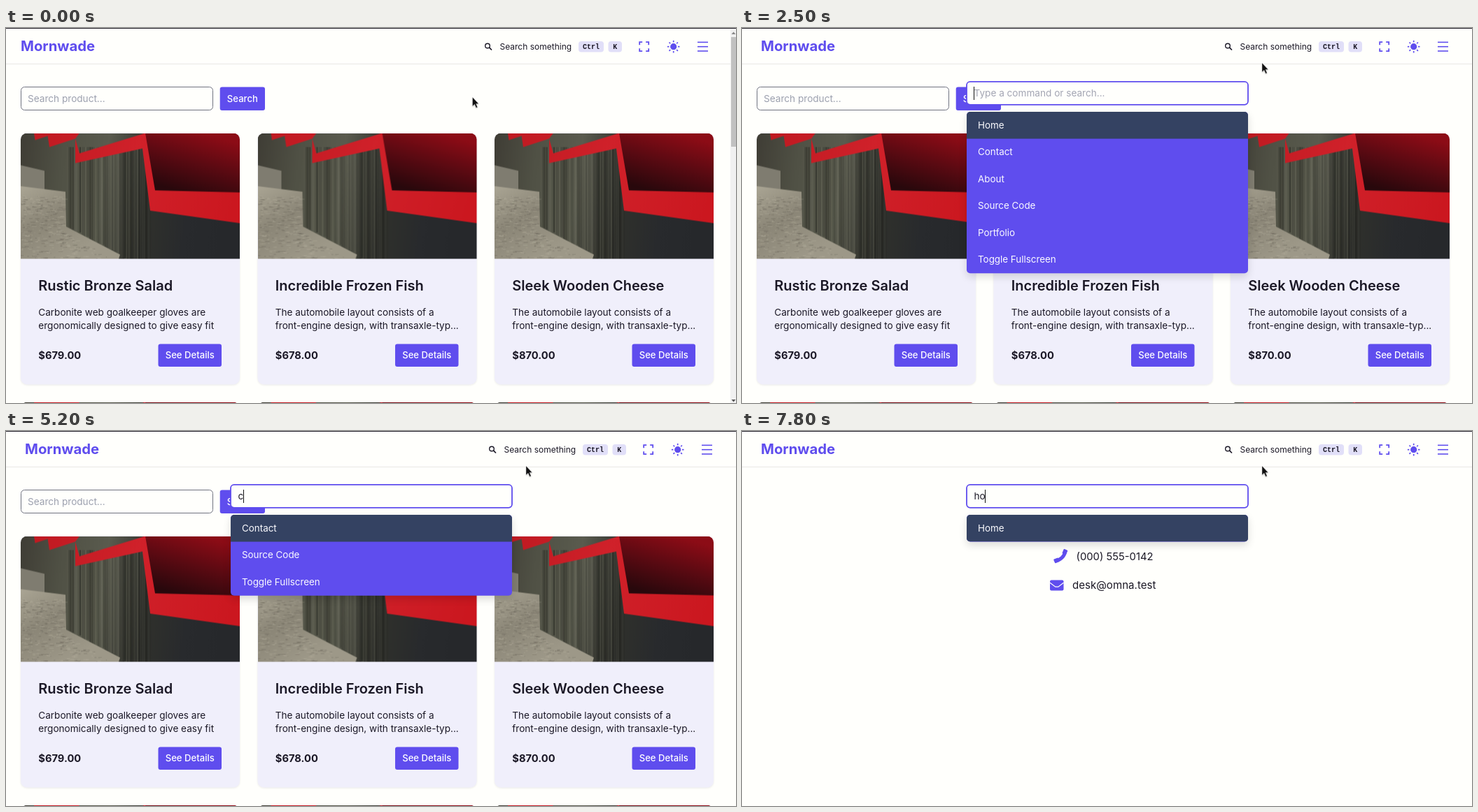
Recreate the animation shown at these times as an HTML page with a canvas. Size 1043 px wide and 537 px high, loop 8 s.

```html
<!DOCTYPE html>
<html lang="en">
<head>
<meta charset="utf-8">
<title>Shop command menu</title>
<style>
html, body { margin: 0; width: 100%; height: 100%; overflow: hidden; background: #fffffc; }
canvas { display: block; }
</style>
</head>
<body>
<canvas id="stage" width="1043" height="537"></canvas>
<script>
const W = 1043, H = 537, LOOP = 8000, TICK = 100;
const PAGE = '#fffffc', PURPLE = '#5f4dee', SLATE = '#344262', INK = '#1b1826';
const OPEN_SHOP = 1250, TYPE_CONTACT = 5200, GO_CONTACT = 5900, OPEN_CONTACT = 6900;
const ctx = document.getElementById('stage').getContext('2d');

const MENU = ['Home', 'Contact', 'About', 'Source Code', 'Portfolio', 'Toggle Fullscreen'];
const FRONT_ENGINE = ['The automobile layout consists of a', 'front-engine design, with transaxle-typ...'];
const CARDS = [
  ['Rustic Bronze Salad', '$679.00', 'Carbonite web goalkeeper gloves are', 'ergonomically designed to give easy fit'],
  ['Incredible Frozen Fish', '$678.00', ...FRONT_ENGINE],
  ['Sleek Wooden Cheese', '$870.00', ...FRONT_ENGINE]
];

const clamp = (v, lo = 0, hi = 1) => Math.min(hi, Math.max(lo, v));
const mix = (a, b, p) => a + (b - a) * p;

// ---- motion ----

// Three hand movements, each with a start, a duration and an end point
function pointerAt(t) {
  let x = 666.5, y = 99;
  for (const [start, duration, toX, toY] of [[200, 200, 696, 78], [500, 200, 751, 33], [1800, 300, 743, 50]]) {
    const p = clamp((t - start) / duration);
    x = mix(x, toX, p);
    y = mix(y, toY, p);
  }
  return [x, y];
}

// Entrance overshoots to 1.01 and settles over 200 ms; exit shrinks and fades
function modalAt(t) {
  const exit = (t - GO_CONTACT) / 200;
  if (exit >= 0 && exit < 1) return { scale: 1 - exit * .01, alpha: 1 - exit, closing: true };
  const p = clamp((t - (t < GO_CONTACT ? OPEN_SHOP : OPEN_CONTACT)) / 200);
  return { scale: p < .5 ? .99 + p * .04 : 1.02 - p * .02, alpha: clamp(p * 2) };
}

function queryAt(t) {
  const typed = (word, keys) => word.slice(0, keys.filter(key => t >= key).length);
  return t < OPEN_CONTACT ? typed('conta', [5200, 5300, 5300, 5500, 5600]) : typed('ho', [7600, 7800]);
}

// Four rows down, then three back up, one key press every 200 ms
function activeAt(t) {
  if (t >= TYPE_CONTACT) return 0;
  const down = Math.round(clamp(1 + 1.5 * Math.floor((t - 3000) / 200), 0, 4));
  const up = clamp(1 + Math.floor((t - 3700) / 200), 0, 3);
  return down - up;
}

function caretAt(t) {
  if (t >= TYPE_CONTACT) return t < GO_CONTACT || t >= OPEN_CONTACT;
  return Math.floor((t - 1300) / 600) % 2 === 0;
}

// ---- drawing helpers ----

function text(str, x, y, size, weight = 400, color = INK, align = 'left', family = 'Inter, sans-serif') {
  ctx.font = `${weight} ${size}px ${family}`;
  ctx.textAlign = align;
  ctx.fillStyle = color;
  ctx.fillText(str, x, y);
}

function box(x, y, w, h, r, fill, stroke, line = 1) {
  ctx.beginPath();
  ctx.roundRect(x, y, w, h, r);
  if (fill) { ctx.fillStyle = fill; ctx.fill(); }
  if (stroke) { ctx.strokeStyle = stroke; ctx.lineWidth = line; ctx.stroke(); }
}

function poly(c, points, fill) {
  c.beginPath();
  points.forEach(([x, y]) => c.lineTo(x, y));
  c.closePath();
  c.fillStyle = fill;
  c.fill();
}

function line(points, color, width) {
  ctx.beginPath();
  points.forEach(([x, y]) => ctx.lineTo(x, y));
  ctx.strokeStyle = color;
  ctx.lineWidth = width;
  ctx.stroke();
}

function arc(x, y, r, from = 0, to = Math.PI * 2) {
  ctx.beginPath();
  ctx.arc(x, y, r, from, to);
}

function withShadow(alpha, blur, dy, paint) {
  ctx.save();
  ctx.shadowColor = `rgba(0,0,0,${alpha})`;
  ctx.shadowBlur = blur;
  ctx.shadowOffsetY = dy;
  paint();
  ctx.restore();
}

// ---- product photo: concrete, grey panels and a red zigzag ----

function makePhoto(w, h) {
  const photo = document.createElement('canvas');
  photo.width = w;
  photo.height = h;
  const c = photo.getContext('2d');
  const blend = (x1, y1, x2, y2, ...colors) => {
    const g = c.createLinearGradient(x1, y1, x2, y2);
    colors.forEach((color, i) => g.addColorStop(i / (colors.length - 1), color));
    return g;
  };
  let seed = 7;
  const rand = () => (seed = seed * 16807 % 2147483647) / 2147483647;

  c.fillStyle = blend(0, 0, w, 40, '#3f3d35', '#505145', '#5a5b4e', '#30312c', '#282a2d', '#26282b');
  c.fillRect(0, 0, w, h);
  poly(c, [[0, 46], [34, 54], [34, 82], [0, 78]], '#7f7c70');
  for (let x = 66; x < 186; x += 2) {
    const edge = 128 + (x - 66) * .6 + rand() * 8;
    c.fillStyle = rand() < .6 ? `rgba(15,16,14,${rand() * .4})` : `rgba(160,160,140,${rand() * .15})`;
    c.fillRect(x, 20, 1 + rand() * 2, edge - 20);
  }
  poly(c, [[0, 76], [64, 84], [65, 134], [142, 174], [140, h], [0, h]], blend(0, 76, 60, h, '#aaa594', '#8b8677', '#9d9888'));
  for (let i = 0; i < 350; i++) {
    const y = mix(90, h, rand());
    c.fillStyle = rand() < .5 ? 'rgba(50,48,40,.2)' : 'rgba(215,210,190,.2)';
    c.fillRect(rand() * Math.max(60, (y - 105) * 1.7), y, 1 + rand() * 6, 1);
  }
  poly(c, [[175, 0], [w, 0], [w, 88], [190, 84]], blend(260, 0, 235, 86, '#8c0c16', '#590a12', '#28080c'));

  const red = blend(0, 0, w, 100, '#bd1920', '#d0212a', '#cb171f');
  for (const s of [1, .5]) poly(c, [[38, 0], [84, 0], [78, 8], [41, 20]].map(([x, y]) => [x * s, y * s]), red);
  poly(c, [[78, 8], [84, 29], [178, 0], [192, 82], [w, 85], [w, 129], [185, 111], [174, 22], [78, 43]], red);
  return photo;
}
const photo = makePhoto(313, 180);

function drawPhoto(x, y) {
  ctx.save();
  ctx.beginPath();
  ctx.roundRect(x, y, photo.width, photo.height, [9, 9, 0, 0]);
  ctx.clip();
  ctx.drawImage(photo, x, y);
  ctx.restore();
}

// ---- page parts ----

function drawIcons() {
  arc(688, 25.5, 3.3);
  ctx.strokeStyle = INK;
  ctx.lineWidth = 1.4;
  ctx.stroke();
  line([[690.4, 27.9], [694, 31.5]], INK, 1.7);

  const cy = 26.7;
  for (const sx of [-1, 1]) for (const sy of [-1, 1]) {
    const x = 911.7 + sx * 6.5, y = cy + sy * 6.5;
    line([[x - sx * 4, y], [x, y], [x, y - sy * 4]], PURPLE, 1.8);
  }
  const sunX = 953.7;
  arc(sunX, cy, 4.6);
  ctx.fillStyle = PURPLE;
  ctx.fill();
  for (let i = 0; i < 8; i++) {
    const ray = r => [sunX + Math.cos(i * Math.PI / 4) * r, cy + Math.sin(i * Math.PI / 4) * r];
    line([ray(6.3), ray(8.8)], PURPLE, 1.7);
  }
  for (const dy of [-6.3, 0, 6.3]) line([[988, cy + dy], [1003, cy + dy]], PURPLE, 1.6);
}

function drawHeader(dx) {
  ctx.fillStyle = '#e9e8e6';
  ctx.fillRect(0, 51, W, 1);
  ctx.fillStyle = '#25232d';
  ctx.fillRect(0, 0, W, 1);
  ctx.save();
  ctx.translate(dx, 0);
  text('Mornwade', 21, 33, 20.3, 700, PURPLE);
  text('Search something', 705.5, 31, 12);
  for (const [key, x, w] of [['Ctrl', 818, 36], ['K', 860.5, 19.5]]) {
    box(x, 19, w, 15.5, 4, '#e1dff8');
    text(key, x + w / 2, 29.5, 10, 700, INK, 'center', '"Liberation Mono", monospace');
  }
  drawIcons();
  ctx.restore();
}

function drawButton(label, x, y, w, h) {
  box(x, y, w, h, 3, PURPLE);
  text(label, x + w / 2, y + h / 2 + 4.6, 13.1, 500, '#fff', 'center');
}

function drawShop() {
  box(21.5, 84.5, 274, 33, 5, PAGE, '#6f7280');
  text('Search product...', 31, 105.5, 13.6, 400, '#9ca0ae');
  drawButton('Search', 305.7, 84.5, 64.3, 33.5);
  CARDS.forEach(([title, price, ...about], i) => {
    const x = 21 + i * 338.5, left = x + 25.3;
    withShadow(.08, 3, 1, () => box(x, 150.5, 313, 360, 9, '#f0effb'));
    drawPhoto(x, 150.5);
    text(title, left, 376, 20, 600);
    about.forEach((row, j) => text(row, left, 412 + j * 19.2, 13.55));
    text(price, left, 474, 14.7, 700);
    drawButton('See Details', x + 196.5, 452.5, 90.5, 32.5);
    drawPhoto(x, 535.8);
  });
}

function drawScrollbar() {
  ctx.fillStyle = '#f1f1f1';
  ctx.fillRect(1035, 1, 8, 536);
  ctx.fillStyle = '#c1c1c1';
  ctx.fillRect(1036, 13, 7, 157);
  const tip = (y, dy, color) => poly(ctx, [[1036.5, y], [1042.5, y], [1039.5, y + dy]], color);
  tip(9, -3.5, '#888');
  tip(532, 3.5, '#555');
}

function drawContact() {
  arc(446, 170, 16, .1, Math.PI / 2 - .1);
  ctx.strokeStyle = PURPLE;
  ctx.lineWidth = 5;
  ctx.stroke();
  for (const [x, y, angle] of [[450.3, 185, -.4], [461, 174, .4]]) {
    ctx.save();
    ctx.translate(x, y);
    ctx.rotate(angle);
    if (angle < 0) box(-4.5, -3, 7, 6, 1, PURPLE);
    else box(-3, -4.5, 6, 7, 1, PURPLE);
    ctx.restore();
  }
  text('(000) 555-0142', 477.5, 184.5, 14.8);
  box(440, 213.5, 19.5, 15, 2, PURPLE);
  line([[440, 217.3], [447.8, 223.2], [451.8, 223.2], [459.5, 217.3]], PAGE, 1.2);
  text('desk@omna.test', 472, 226, 15.1);
}

function drawStatus(alpha) {
  ctx.save();
  ctx.globalAlpha = alpha;
  box(0, 523, 345, 14, [0, 3, 0, 0], '#0d0d13');
  text('Waiting for 63fcc265677c41587313342e.mockapi.io…', 2, 536, 11.5, 400, '#e8e8e8', 'left', '"Noto Sans", sans-serif');
  ctx.restore();
}

function drawModal(t, { scale, alpha, closing }) {
  const query = queryAt(t), items = MENU.filter(item => item.toLowerCase().includes(query));
  const left = 321, width = 402, top = 120, rowH = 38.55, height = items.length * rowH;
  const cx = left + width / 2, cy = (77 + top + height) / 2;
  const moving = scale !== 1 || closing;

  ctx.save();
  ctx.globalAlpha = alpha;
  ctx.translate(cx, cy);
  ctx.scale(scale, scale);
  ctx.translate(-cx, -cy);

  box(left, 76.8, width, 33, 5, PAGE, closing ? '#8582aa' : PURPLE, closing ? 1.2 : 1.8);
  text(query || 'Type a command or search...', 331.5, 97.5, 13.6, 400, query ? INK : '#a3a5b3');
  if (caretAt(t)) {
    ctx.fillStyle = '#111';
    ctx.fillRect(query ? Math.round(331 + ctx.measureText(query).width) : 331, 84, 1, 19);
  }

  withShadow(.14, 12, 5, () => box(left, top, width, height, 5, PURPLE));
  ctx.save();
  ctx.beginPath();
  ctx.roundRect(left, top, width, height, 5);
  ctx.clip();
  ctx.fillStyle = SLATE;
  ctx.fillRect(left, top + activeAt(t) * rowH, width, rowH);
  ctx.restore();
  items.forEach((item, i) => {
    const y = top + i * rowH;
    // Row seams show faintly while the panel is being scaled
    if (moving && i && i % 2 === 0) line([[left, y], [left + width, y]], 'rgba(255,255,255,.2)', 1);
    text(item, 337, y + 23.7, 13.4, 400, moving ? 'rgba(255,255,255,.82)' : '#fbfbff');
  });
  ctx.restore();
}

function drawPointer([x, y]) {
  ctx.save();
  ctx.translate(x, y);
  withShadow(.3, 2, 1, () => {
    poly(ctx, [[0, 0], [0, 13], [3, 10.3], [5.2, 15.3], [7.2, 14.4], [5.1, 9.6], [8.8, 9.6]], '#111');
  });
  ctx.strokeStyle = 'rgba(255,255,255,.6)';
  ctx.lineWidth = .6;
  ctx.stroke();
  ctx.restore();
}

function draw(t) {
  const menuOpened = t >= OPEN_SHOP, modal = modalAt(t), statusAlpha = clamp((6400 - t) / 300);
  ctx.fillStyle = PAGE;
  ctx.fillRect(0, 0, W, H);
  if (t < GO_CONTACT) drawShop();
  else drawContact();
  drawHeader(menuOpened ? 6 : 0);
  if (!menuOpened) drawScrollbar();
  if (modal.alpha > 0) drawModal(t, modal);
  if (t >= GO_CONTACT && statusAlpha > 0) drawStatus(statusAlpha);
  drawPointer(pointerAt(t));
}

// The screen updates ten times a second
const start = performance.now();
function frame() {
  const t = (performance.now() - start) % LOOP;
  draw(Math.floor(t / TICK) * TICK);
  requestAnimationFrame(frame);
}
frame();
</script>
</body>
</html>
```
